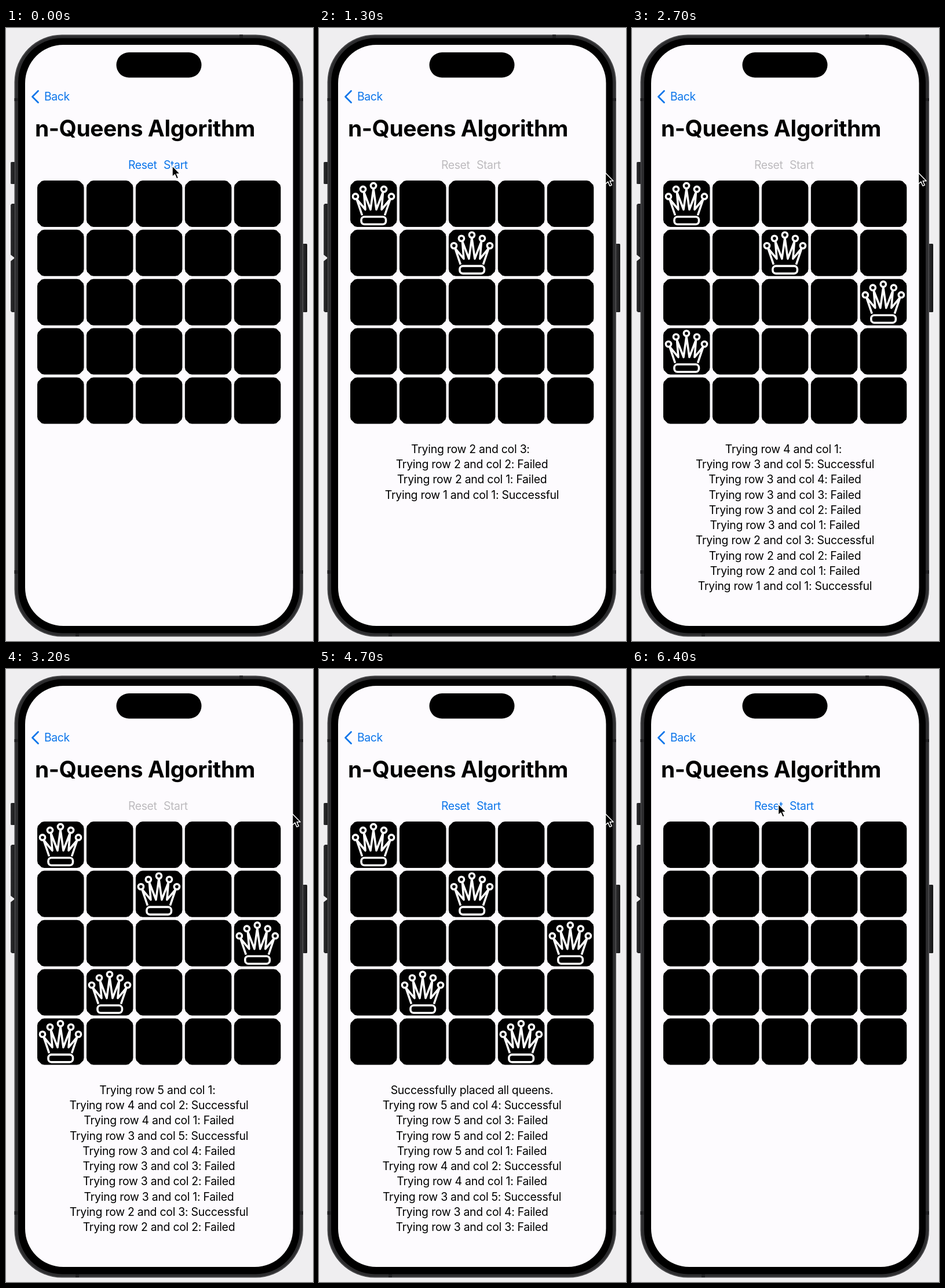
Animation of 530 by 1057 pixels, one loop 6.5 s. Source, as an HTML page:

```html
<!DOCTYPE html>
<html lang="en">
<head>
<meta charset="utf-8">
<title>n-Queens Algorithm</title>
<style>
  html, body { margin: 0; width: 100%; height: 100%; overflow: hidden; background: #efeef0; }
  svg { display: block; width: 530px; height: 1057px; }
  text { font-family: Inter, "Liberation Sans", sans-serif; font-size: 19.4px; letter-spacing: -0.38px; white-space: pre; }
  .title { font-size: 39px; font-weight: 700; letter-spacing: -0.45px; }
  .log { text-anchor: middle; letter-spacing: -0.25px; }
</style>
</head>
<body>
<svg viewBox="0 0 530 1057">
  <defs>
    <linearGradient id="key">
      <stop offset="0" stop-color="#3a3a3c"/>
      <stop offset=".4" stop-color="#232325"/>
      <stop offset="1" stop-color="#161617"/>
    </linearGradient>
    <path id="cell" d="M12 0H68.5L73 1L79.5 7.5L80.5 12V68L79.5 72.5L73 79L68.5 80H12L7.5 79L1 72.5L0 68V12L1 7.5L7.5 1Z"/>
    <g id="queen" fill="none" stroke="#fff" stroke-width="3.6" stroke-linejoin="round">
      <path d="M20.5 60L11 32L26 50L23.5 20L35 50L40 14L45 50L56.5 20L54 50L69 32L59.5 60"/>
      <circle cx="9" cy="27.5" r="4.6"/>
      <circle cx="22" cy="15" r="4.6"/>
      <circle cx="40" cy="9" r="4.6"/>
      <circle cx="58" cy="15" r="4.6"/>
      <circle cx="71" cy="27.5" r="4.6"/>
      <rect x="19" y="62.5" width="42.5" height="13" rx="5.5"/>
    </g>
  </defs>

  <rect width="530" height="1057" fill="#efeef0"/>
  <g fill="url(#key)">
    <rect x="8" y="231" width="8" height="38" rx="1.5"/>
    <path d="M16 303H10L8 305V391L14 395.5V397.5L8 402V488L10 490H16Z"/>
    <rect x="512" y="372" width="8" height="118" rx="1.5"/>
  </g>
  <rect x="14.5" y="11.5" width="498.5" height="1038" rx="82" fill="#444446"/>
  <rect x="16.5" y="13.5" width="494.5" height="1034" rx="80" fill="#2c2c2e"/>
  <g fill="#1f1f21">
    <rect x="403" y="11.5" width="6" height="6"/>
    <rect x="120" y="1043" width="6" height="6"/>
    <rect x="14.5" y="121" width="6" height="5"/>
    <rect x="507" y="121" width="6" height="5"/>
    <rect x="14.5" y="935" width="6" height="6"/>
    <rect x="507" y="935" width="6" height="6"/>
  </g>
  <rect x="21" y="17.5" width="486" height="1026" rx="76" fill="#000"/>
  <rect x="33" y="29" width="462.5" height="1002" rx="66" fill="#fdfbfe"/>
  <rect x="190.5" y="42" width="147" height="43.5" rx="21.75" fill="#000"/>

  <path d="M55.5 108.5L45.5 118.5L55.5 128.5" fill="none" stroke="#0b75ea" stroke-width="2.8" stroke-linecap="round" stroke-linejoin="round"/>
  <text x="66" y="125.3" fill="#0b75ea">Back</text>
  <text x="50" y="187" class="title">n-Queens Algorithm</text>
  <text id="reset" x="211" y="243.2">Reset</text>
  <text id="start" x="272" y="243.2">Start</text>
  <g id="board"></g>
  <g id="log"></g>
  <path id="cursor" d="M0 0V19.2L4.4 15.2L7.5 22.5L10.8 21.1L7.7 14H13.6Z" fill="#000" stroke="#fff" stroke-width="1.5" stroke-linejoin="round"/>
</svg>
<script>
const LOOP = 6500, STEP = 258, BEGIN = 282, CLEAR = 5950;
const COLS = [1, 3, 5, 2, 4];
const BLUE = [11, 117, 234], GRAY = [189, 187, 190];
const byId = id => document.getElementById(id);

function add(parent, tag, attrs) {
  const el = document.createElementNS('http://www.w3.org/2000/svg', tag);
  for (const k in attrs) el.setAttribute(k, attrs[k]);
  return parent.appendChild(el);
}

const cellAt = (row, col) => `translate(${54 + 84.95 * col} ${263 + 84.85 * row})`;
for (let i = 0; i < 25; i++)
  add(byId('board'), 'use', { href: '#cell', transform: cellAt(Math.floor(i / 5), i % 5) });

const queens = COLS.map(() => add(byId('board'), 'use', { href: '#queen' }));
const lines = Array.from({ length: 10 }, (_, i) =>
  add(byId('log'), 'text', { x: 264, y: 732.8 + 26.25 * i, class: 'log' }));

// every square tried, in order
const tries = COLS.flatMap((goal, row) =>
  Array.from({ length: goal }, (_, c) => ({ row, col: c + 1, ok: c + 1 === goal })));
const LAST = tries.length;
const DONE = BEGIN + (LAST + 1) * STEP;

const clamp = v => Math.min(1, Math.max(0, v));
const ramp = (t, a, b) => clamp((t - a) / (b - a));
const ease = p => p * p * (3 - 2 * p);
const mix = (a, b, p) => a + (b - a) * p;

function logLines(count) {
  const out = tries.slice(0, count).map((s, i) => {
    const result = i < count - 1 ? (s.ok ? 'Successful' : 'Failed') : '';
    return `Trying row ${s.row + 1} and col ${s.col}: ${result}`;
  });
  if (count > LAST + 1) out.push('Successfully placed all queens.');
  return out.reverse();
}

function cursorPos(t) {
  const out = ease(ramp(t, 300, 690)), back = ease(ramp(t, 5080, 5700));
  return t < 3000
    ? [mix(287, 494.5, out), mix(237.5, 249.8, out)]
    : [mix(494.5, 252.5, back), mix(249.8, 232.8, back)];
}

function draw(t) {
  const running = t >= BEGIN && t < CLEAR;
  const count = running ? Math.min(LAST + 2, Math.floor((t - BEGIN) / STEP) + 1) : 0;
  const now = count ? tries[Math.min(count, LAST) - 1] : { row: -1 };

  queens.forEach((q, row) => {
    const shown = row <= now.row;
    q.setAttribute('visibility', shown ? 'visible' : 'hidden');
    if (shown) q.setAttribute('transform', cellAt(row, (row < now.row ? COLS[row] : now.col) - 1));
  });

  const log = logLines(count);
  lines.forEach((el, i) => { el.textContent = log[i] || ''; });

  const off = ramp(t, BEGIN, BEGIN + 220) - ramp(t, DONE, DONE + 250);
  const tint = `rgb(${BLUE.map((v, i) => Math.round(mix(v, GRAY[i], off)))})`;
  byId('reset').setAttribute('fill', tint);
  byId('start').setAttribute('fill', tint);
  byId('start').setAttribute('opacity', t > 120 && t < BEGIN ? 0.35 : 1);
  byId('reset').setAttribute('opacity', t > 5840 && t < CLEAR ? 0.35 : 1);

  byId('cursor').setAttribute('transform', `translate(${cursorPos(t)})`);
}

const origin = performance.now();
function tick() {
  draw((performance.now() - origin) % LOOP);
  requestAnimationFrame(tick);
}
draw(0);
requestAnimationFrame(tick);
</script>
</body>
</html>
```
